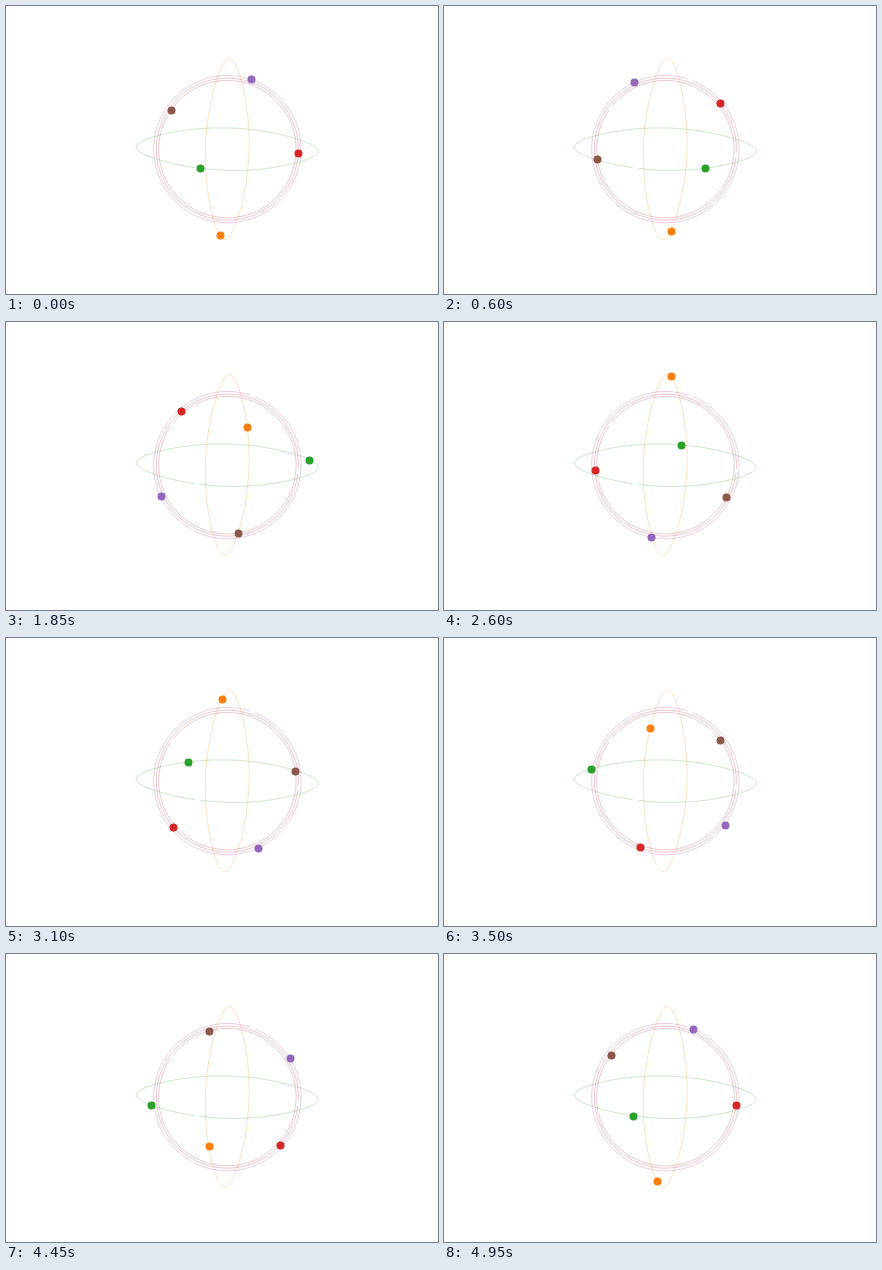
An HTML page for the animation above (5 s loop, 432x288 px).

```html
<!DOCTYPE html>
<html lang="en">
<head>
<meta charset="utf-8">
<title>Orbits</title>
<style>
html, body { margin: 0; width: 100%; height: 100%; overflow: hidden; background: #fff; }
svg { display: block; width: 432px; height: 288px; }
path { fill: none; stroke-width: .5; }
</style>
</head>
<body>
<svg id="stage" viewBox="0 0 432 288"></svg>
<script>
const STEPS = 100, STEP_MS = 50, CX = 221.4, CY = 143.15;
const stage = document.getElementById('stage');

// Position = centre + u * cos(angle) + v * sin(angle); pinch narrows the tips
const oval = (c, u, v, start, color) =>
  ({ c, u, v, pinch: .06, start, color, line: color, alpha: .48 });
const ring = (r, start, color, line) =>
  ({ c: [CX, CY], u: [r, 0], v: [0, -r], pinch: 0, start, color, line, alpha: .62 });

const orbits = [
  oval([221.2, CY], [-2.3, 90.6], [20.6, 0], -18.1, '#ff7f0e'),
  oval([221.3, CY], [91, 2.1], [0, -20], -107.4, '#2ca02c'),
  ring(71, -2.9, '#d62728', '#cf4557'),
  ring(73.7, 71.7, '#9467bd', '#b566a6'),
  ring(68.7, 145.3, '#8c564b', '#b3586a')
];

function add(name, attrs) {
  const el = document.createElementNS('http://www.w3.org/2000/svg', name);
  for (const key in attrs) el.setAttribute(key, attrs[key]);
  return stage.appendChild(el);
}

function place(o, step) {
  const a = (o.start + step * 360 / STEPS) * Math.PI / 180;
  const cos = Math.cos(a), sin = Math.sin(a) - o.pinch * Math.sin(3 * a);
  return [0, 1].map(i => o.c[i] + o.u[i] * cos + o.v[i] * sin);
}

// Each trail stops one step short of closing
for (const o of orbits) {
  const points = Array.from({ length: STEPS }, (_, i) =>
    place(o, i).map(n => n.toFixed(2)).join(' '));
  add('path', { d: 'M' + points.join('L'), stroke: o.line, 'stroke-opacity': o.alpha });
}
for (const o of orbits) o.dot = add('circle', { r: 4, fill: o.color });

// Dots sit on pixel centres
const snap = n => Math.floor(n + .5) + .5;

function draw(ms) {
  const step = Math.floor(ms / STEP_MS) % STEPS;
  for (const o of orbits) {
    const [x, y] = place(o, step);
    o.dot.setAttribute('cx', snap(x));
    o.dot.setAttribute('cy', snap(y));
  }
}

const begin = performance.now();
function tick() {
  draw(performance.now() - begin);
  requestAnimationFrame(tick);
}
tick();
</script>
</body>
</html>
```
